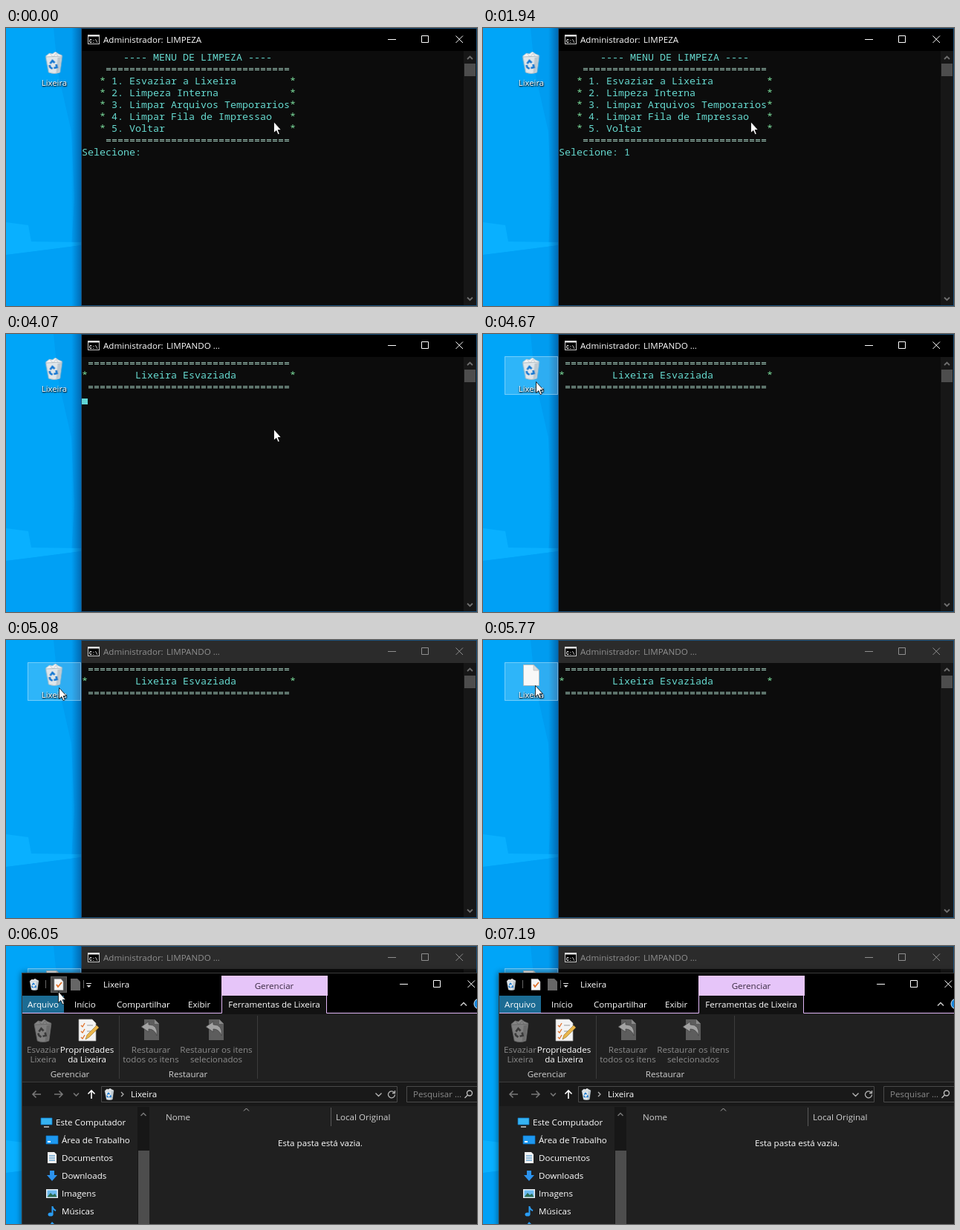
An HTML page for the animation above (7.91 s loop, 634 px wide and 375 px high).

```html
<!DOCTYPE html>
<html lang="pt-BR">
<head>
<meta charset="utf-8">
<title>Limpeza</title>
<style>
html, body { margin: 0; width: 100%; height: 100%; overflow: hidden; background: #0c0c0c; }
svg { display: block; }
text { font: 11.6px "Open Sans", "Noto Sans", sans-serif; fill: #fff; white-space: pre; }
.mid { text-anchor: middle; }
.off { fill: #8c8c8c; }
.soft { fill: #d0d0d0; }
.term text { font: 500 13.333px "Noto Sans Mono", "DejaVu Sans Mono", monospace; fill: #66d9cf; }
.term .star { fill: #7bdd9c; }
.term .rule { fill: #a5cfc1; }
.line { fill: none; stroke: currentColor; }
.cap text { fill: currentColor; }
.label { font-size: 11.3px; text-shadow: 0 1px 2px #000, 1px 1px 1px #0008; }

.cap, .bar, .menu, .one, .done, .t1, .t2, .sel, .bin, .doc, .win, .hover, #caret, #mouse {
  animation: 7910ms step-end infinite;
}
.cap { animation-name: cap; }
.bar { animation-name: bar; }
.menu { animation-name: menu; }
.one { animation-name: one; }
.done { animation-name: done; }
.t1 { animation-name: t1; }
.t2 { animation-name: t2; }
.sel { animation-name: sel; }
.bin { animation-name: bin; }
.doc { animation-name: doc; }
.win { animation-name: win; transform-origin: 370px 300px; }
.hover { animation-name: hover; }
#caret { animation-name: caret; }
#mouse { animation-name: mouse; }

@keyframes cap { 0% { color: #fff } 64.22%, to { color: #8f8f8f } }
@keyframes bar { 0% { fill: #000 } 64.22%, to { fill: #2b2b2b } }
@keyframes menu { 0% { opacity: 1 } 26.42%, to { opacity: 0 } }
@keyframes one { 0% { opacity: 0 } 8.09% { opacity: 1 } 26.42%, to { opacity: 0 } }
@keyframes done { 0% { opacity: 0 } 35.27%, to { opacity: 1 } }
@keyframes t1 { 0% { opacity: 1 } 28.31%, to { opacity: 0 } }
@keyframes t2 { 0% { opacity: 0 } 28.31%, to { opacity: 1 } }
@keyframes sel { 0% { opacity: 0 } 59.03%, to { opacity: 1 } }
@keyframes bin { 0% { opacity: 1 } 72.94%, to { opacity: 0 } }
@keyframes doc { 0% { opacity: 0 } 72.94%, to { opacity: 1 } }
@keyframes win {
  0% { opacity: 0; transform: scale(.975) }
  74.46% { opacity: .8; transform: scale(.975) }
  76.48%, to { opacity: 1; transform: none }
}
@keyframes hover { 0% { opacity: 1 } 83.94%, to { opacity: 0 } }
@keyframes caret {
  0% { opacity: 0; transform: translate(190px, 167px) }
  4.93% { opacity: 1; transform: translate(190px, 167px) }
  8.09% { opacity: 1; transform: translate(198px, 167px) }
  11.88% { opacity: 0; transform: translate(198px, 167px) }
  18.96% { opacity: 1; transform: translate(198px, 167px) }
  24.52% { opacity: 0; transform: translate(198px, 167px) }
  26.42% { opacity: 1; transform: translate(102px, 183px) }
  28.31% { opacity: 0; transform: translate(102px, 183px) }
  31.85% { opacity: 1; transform: translate(102px, 39px) }
  33.37% { opacity: 0; transform: translate(102px, 39px) }
  35.27% { opacity: 1; transform: translate(102px, 87px) }
  43.99% { opacity: 0; transform: translate(102px, 87px) }
  51.45% { opacity: 1; transform: translate(102px, 87px) }
  59.03%, to { opacity: 0; transform: translate(102px, 87px) }
}
@keyframes mouse {
  0% { opacity: 1; transform: translate(360px, 126px) }
  31.85% { opacity: 1; transform: translate(360px, 128px) }
  53.35% { opacity: 1; transform: translate(133px, 92px) }
  55.24% { opacity: 1; transform: translate(88px, 84px) }
  57.14% { opacity: 1; transform: translate(82px, 77px) }
  59.03% { opacity: 1; transform: translate(71px, 64px) }
  66.11% { opacity: 1; transform: translate(70px, 61px) }
  83.94% { opacity: 1; transform: translate(185px, 150px) }
  85.84% { opacity: 1; transform: translate(340px, 245px) }
  87.48% { opacity: 1; transform: translate(492px, 341px) }
  89.38% { opacity: 1; transform: translate(511px, 358px) }
  90.89%, to { opacity: 0; transform: translate(511px, 358px) }
}
</style>
</head>
<body>
<svg width="634" height="375" viewBox="0 0 634 375">
  <defs>
    <linearGradient id="edge"><stop offset="0" stop-color="#003a78" stop-opacity="0"/><stop offset="1" stop-color="#003a78" stop-opacity=".55"/></linearGradient>
    <filter id="shade" x="-5%" y="-8%" width="110%" height="116%"><feGaussianBlur stdDeviation="4"/></filter>
    <symbol id="trash" viewBox="0 0 24 30">
      <path d="M1 6 6 2 10 3 14 0 18 3 23 5 21 10H3Z" fill="#f4f4f4" stroke="#b9c3ca" stroke-width=".7"/>
      <path d="M7 3 11 7 15 2 18 7" fill="none" stroke="#c2cad0"/>
      <path d="M1 7 23 6 20 28Q12 31 5 28Z" fill="#dfe6ea" stroke="#a9b5bd" stroke-width=".8"/>
      <path d="M17 8 22 7 19 27 15 29Z" fill="#bcc7cf"/>
      <path d="M7 16 10 12 13 15M15 17 16 21 12 22M10 23 7 21 6 18" fill="none" stroke="#1778d2" stroke-width="2.6"/>
    </symbol>
    <symbol id="sheet" viewBox="0 0 14 16">
      <path d="M1 .5H10L13 4V15.5H1Z" fill="#f5f5f5" stroke="#aaa" stroke-width=".6"/>
      <path d="M4 8 6 11 11 5" fill="none" stroke="#e07028" stroke-width="1.8"/>
    </symbol>
    <symbol id="undo" viewBox="0 0 28 30">
      <path d="M5 1H19L25 7V29H5Z" fill="#5d5d5d"/><path d="M19 1V7H25Z" fill="#8a8a8a"/>
      <path d="M1 11 11 4V8Q24 8 22 23 19 14 11 14V18Z" fill="#a2a2a2" stroke="#444" stroke-width=".8"/>
    </symbol>
    <g id="buttons" class="line"><path d="M-96 15.5H-85M-50.500 10.500H-41.500V19.500H-50.500ZM-4.500 10.500 5 20M5 10.500-4.500 20"/></g>
  </defs>

  <!-- desktop -->
  <rect width="110" height="375" fill="#00a5f8"/>
  <path d="M64 0H102V375H88V296L92 230 88 140 70 60Z" fill="#009cf0"/>
  <path d="M0 262 30 266 34 288 102 289V293L40 301 0 306Z" fill="#09b0ff"/>
  <path d="M0 306 40 301 102 293V375H0Z" fill="#00a0f5"/>
  <rect x="88" width="14" height="375" fill="url(#edge)"/>
  <rect class="sel" x="29.500" y="30.500" width="71" height="51" fill="#fff" fill-opacity=".18" stroke="#fff" stroke-opacity=".4"/>
  <use class="bin" href="#trash" x="52" y="32" width="25" height="30"/>
  <g class="doc">
    <path d="M54.500 33.500H68L75.500 41V61.500H54.500Z" fill="#f8f8f8" stroke="#b4b4b4" stroke-width=".8"/>
    <path d="M68 33.500V41H75.500Z" fill="#d8dde0" stroke="#b4b4b4" stroke-width=".6"/>
  </g>
  <text class="label mid" x="65" y="78">Lixeira</text>

  <!-- console -->
  <rect x="101" width="533" height="375" fill="#1b4f78"/>
  <rect x="102" y="1" width="531" height="373" fill="#0c0c0c"/>
  <rect class="bar" x="102" y="1" width="531" height="30"/>
  <rect x="110.500" y="9.500" width="15" height="12" fill="#000" stroke="#c9c9c9"/>
  <path d="M110 10.500H126" stroke="#e8e8e8" stroke-width="2"/>
  <text x="112" y="19.500" style="font: bold 6.500px 'Liberation Mono', monospace">C:\</text>
  <g class="cap">
    <text x="131" y="20">Administrador:</text>
    <text class="t1" x="216" y="20">LIMPEZA</text>
    <text class="t2" x="216" y="20">LIMPANDO ...</text>
    <use href="#buttons" x="610"/>
  </g>
  <rect x="616" y="31" width="17" height="343" fill="#171717"/>
  <rect x="617" y="48" width="15" height="17" fill="#4d4d4d"/>
  <path d="M621 42 624.500 38.500 628 42M621 363.500 624.500 367 628 363.500" fill="none" stroke="#6e6e6e" stroke-width="1.800"/>
  <g class="term">
    <g class="menu" id="menu"></g>
    <text class="one" x="190" y="172">1</text>
    <g class="done" id="done"></g>
    <rect id="caret" width="8" height="8" fill="#61d6d6"/>
  </g>

  <!-- folder window -->
  <g class="win">
    <rect x="21" y="36" width="640" height="360" fill="#000" opacity=".55" filter="url(#shade)"/>
    <rect x="21" y="36" width="620" height="345" fill="#3a3a3a"/>
    <rect x="22" y="37" width="620" height="54" fill="#000"/>
    <rect x="22" y="91" width="620" height="92" fill="#202020"/>
    <rect x="22" y="183" width="620" height="34" fill="#191919"/>
    <rect x="22" y="216" width="620" height="165" fill="#202020"/>

    <use href="#trash" x="31" y="44" width="14" height="16"/>
    <path d="M53.500 46V57M104.500 46V57" stroke="#666"/>
    <rect class="hover" x="60.500" y="41.500" width="21" height="21" fill="#4a4a4a" stroke="#626262"/>
    <use href="#sheet" x="64" y="44" width="14" height="16"/>
    <path d="M87 44H96L100 48V60H87Z" fill="#666"/>
    <path d="M108 50.500H115" stroke="#ddd"/><path d="M108.500 53H114.500L111.500 56Z" fill="#ddd"/>
    <text x="131" y="56">Lixeira</text>
    <use href="#buttons" x="626" y="36" color="#fff"/>

    <rect x="22" y="67" width="56" height="24" fill="#1c6c94"/>
    <path d="M22 90.500H290.500V67M634 90.500H431.500V67" fill="none" stroke="#e0b6f6"/>
    <rect x="291" y="67" width="140" height="25" fill="#121212"/>
    <rect x="290" y="40" width="143" height="27" fill="#e6c5f9"/>
    <text class="mid" x="361" y="58" style="fill:#3a2b43">Gerenciar</text>
    <text class="mid" x="361" y="83">Ferramentas de Lixeira</text>
    <text class="mid" x="50" y="83">Arquivo</text>
    <text x="92" y="83">Início</text>
    <text x="149" y="83">Compartilhar</text>
    <text x="245" y="83">Exibir</text>
    <path d="M612 80.500 616 76.500 620 80.500" fill="none" stroke="#ccc" stroke-width="1.500"/>
    <circle cx="637" cy="78" r="7" fill="#1684d8" stroke="#d4e8f7"/>

    <use href="#trash" x="36" y="99" width="27" height="31" style="filter:grayscale(1) brightness(.55)"/>
    <path d="M98 99H116L121 104V128H98Z" fill="#f3f3f3" stroke="#aaa" stroke-width=".7"/>
    <path d="M101 107 103 109 106 104M101 115 103 117 106 112M101 123 103 125 106 120" fill="none" stroke="#e07028" stroke-width="1.300"/>
    <path d="M109 107H117M109 115H114" stroke="#999"/>
    <path d="M107 126 109 120 122 107 125 110 112 123Z" fill="#e9b64c" stroke="#8d6a24" stroke-width=".6"/>
    <use href="#undo" x="181" y="98" width="28" height="30"/>
    <use href="#undo" x="268" y="98" width="28" height="30"/>
    <g class="mid">
      <text class="off" x="50" y="144">Esvaziar</text><text class="off" x="50" y="157">Lixeira</text>
      <text x="109" y="144">Propriedades</text><text x="109" y="157">da Lixeira</text>
      <text class="off" x="195" y="144">Restaurar</text><text class="off" x="195" y="157">todos os itens</text>
      <text class="off" x="283" y="144">Restaurar os itens</text><text class="off" x="283" y="157">selecionados</text>
      <text class="soft" x="86" y="177">Gerenciar</text><text class="soft" x="245" y="177">Restaurar</text>
    </g>
    <path d="M152.500 94V179M338.500 94V179M22 183.500H634" stroke="#3c3c3c"/>

    <g fill="none" stroke-width="1.600">
      <path d="M47 200H36M40.500 195.500 36 200 40.500 204.500M65 200H76M71.500 195.500 76 200 71.500 204.500M91 198.500 94.500 202 98 198.500" stroke="#777"/>
      <path d="M115 206V195M110.500 199.500 115 195 119.500 199.500" stroke="#fff"/>
    </g>
    <path d="M128.500 189.500H526.500V210.500H128.500ZM640 189.500H539.500V210.500H640" fill="#191919" stroke="#4a4a4a"/>
    <use href="#trash" x="132" y="192" width="14" height="16"/>
    <path d="M155 197 158 200 155 203M497.500 198.500 501.500 202.500 505.500 198.500M522.500 197.500A4.500 4.500 0 1 0 523.500 200.500M523.500 195V198.500H520" fill="none" stroke="#b4b4b4" stroke-width="1.300"/>
    <text x="168" y="204">Lixeira</text>
    <text class="off" x="548" y="204">Pesquisar ...</text>
    <g fill="none" stroke="#bbb" stroke-width="1.400"><circle cx="624" cy="198.500" r="3.500"/><path d="M621.500 201 617.500 205"/></g>

    <rect x="177" y="217" width="16" height="160" fill="#171717"/>
    <rect x="178" y="276" width="15" height="100" fill="#4d4d4d"/>
    <path d="M181.500 229 185 225.500 188.500 229" fill="none" stroke="#777" stroke-width="1.500"/>
    <g id="nav"></g>
    <g stroke="#0b74c4" stroke-width=".7">
      <path d="M47 232H62V241H47Z" fill="#35b3f2"/><path d="M51 244H58" stroke="#ccc" stroke-width="1.500"/>
      <path d="M54 256H70V267H54Z" fill="#1e98ef"/><path d="M56 264H60" stroke="#fff" stroke-width="2"/>
    </g>
    <path d="M56 278H65L68 281V293H56Z" fill="#f2f2f2"/>
    <path d="M58 283H66M58 286H66M58 289H66" stroke="#2f83c2"/>
    <path d="M59 303H65V309H69L62 317 55 309H59Z" fill="#2c93ee"/>
    <path d="M54 328H70V340H54Z" fill="#e8eef2"/><path d="M55.500 329.500H68.500V338.500H55.500Z" fill="#69b8ee"/><path d="M55.500 338.500 60 333 63 336 66 334 68.500 338.500Z" fill="#2b6c51"/>
    <ellipse cx="60" cy="362" rx="3.500" ry="2.600" fill="#2a9df4"/><path d="M62.500 362V351Q63 355 67 357" fill="none" stroke="#2a9df4" stroke-width="2"/>
    <path d="M59 376 62 372 66 376Z" fill="#2a9df4"/>

    <text class="soft" x="215" y="235">Nome</text>
    <text class="soft" x="444" y="235">Local Original</text>
    <path d="M320 222.500 323.500 219 327 222.500" fill="none" stroke="#aaa"/>
    <path d="M437.500 218V243" stroke="#5a5a5a"/>
    <text class="mid" x="423" y="270">Esta pasta está vazia.</text>
  </g>

  <path id="mouse" d="M.5.5V15.500L3.900 12.500 6.100 17.700 8.300 16.800 6.100 11.600H10.500Z" fill="#fff" stroke="#000" stroke-width=".8"/>
</svg>
<script>
const add = (id, x, y, str, cls = '') => {
  const el = document.createElementNS('http://www.w3.org/2000/svg', 'text');
  el.setAttribute('x', x);
  el.setAttribute('y', y);
  el.setAttribute('class', cls);
  el.textContent = str;
  document.getElementById(id).append(el);
};
// Console cells are 8 by 16 pixels.
const put = (id, col, row, str, cls) => add(id, 102 + col * 8, 44 + row * 16, str, cls);

put('menu', 7, 0, '---- MENU DE LIMPEZA ----');
['Esvaziar a Lixeira', 'Limpeza Interna', 'Limpar Arquivos Temporarios', 'Limpar Fila de Impressao', 'Voltar']
  .forEach((item, i) => {
    put('menu', 3, i + 2, '*', 'star');
    put('menu', 5, i + 2, `${i + 1}. ${item}`);
    put('menu', 35, i + 2, '*', 'star');
  });
for (const row of [1, 7]) put('menu', 4, row, '='.repeat(31), 'rule');
put('menu', 0, 8, 'Selecione:');

for (const row of [0, 2]) put('done', 1, row, '='.repeat(34), 'rule');
for (const col of [0, 35]) put('done', col, 1, '*', 'star');
put('done', 9, 1, 'Lixeira Esvaziada');

['Este Computador', 'Área de Trabalho', 'Documentos', 'Downloads', 'Imagens', 'Músicas']
  .forEach((name, i) => add('nav', i ? 75 : 67, 242 + i * 24, name));
</script>
</body>
</html>
```
